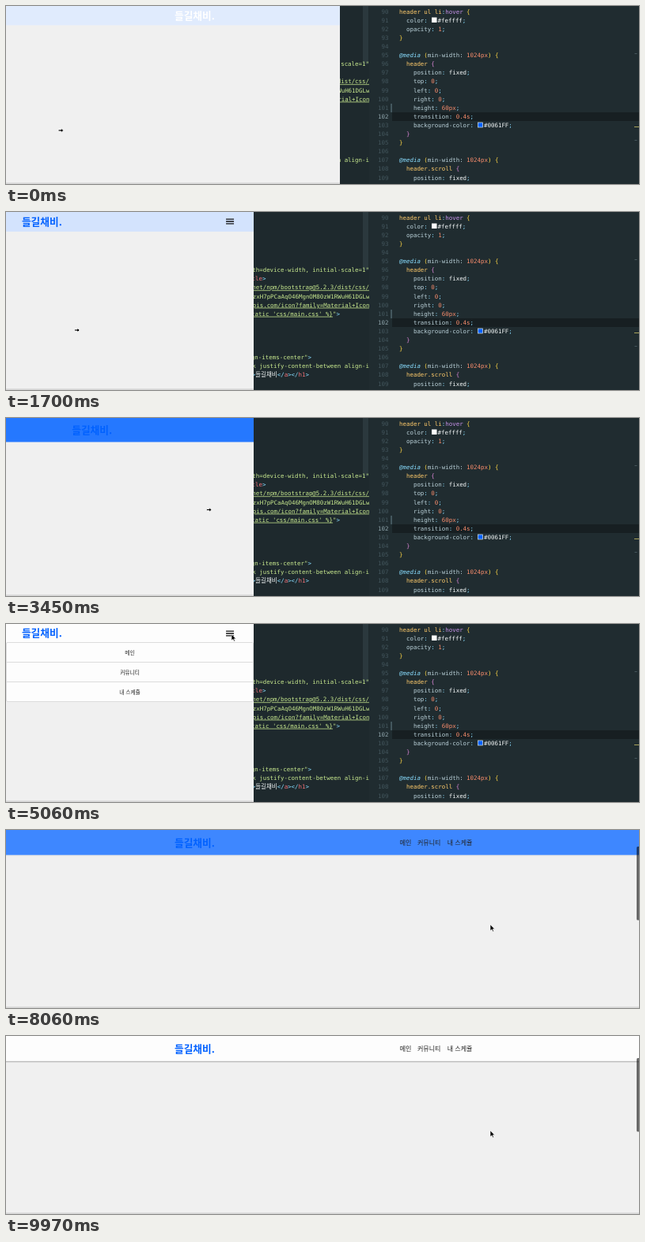
Animation, 800 px wide and 226 px high, one loop 10 s. Source, as an HTML page:

```html
<!DOCTYPE html>
<html lang="ko">
<head>
<meta charset="utf-8">
<title>Responsive header</title>
<style>
html, body { margin: 0; width: 100%; height: 100%; overflow: hidden; background: #202b2f; }
svg { display: block; width: 800px; height: 226px; }
text { white-space: pre; }
.code { font: 7.44px "DejaVu Sans Mono", "Noto Sans Mono", "Noto Sans CJK KR", monospace; fill: #c3d3d8; }
.ko { font-family: "Noto Sans CJK KR", "Noto Sans CJK", sans-serif; }
.y { fill: #ffcb6b; }
.k { fill: #89ddff; font-style: italic; }
.h { fill: #c792ea; }
.p { fill: #b9d0d8; }
.n { fill: #f78c6c; }
.w { fill: #f4f8f8; }
.g { fill: #ffd746; }
.o { fill: #d884d4; }
.s { fill: #c9ea8f; }
.u { fill: #c9ea8f; text-decoration: underline; }
.t { fill: #f07178; }
.c { fill: #89ddff; }
.num { fill: #43565d; }
.num.on { fill: #8fa4ab; }
#logo { font-size: 12.7px; font-weight: 900; }
#nav { font-size: 8px; }
#menu { font-size: 6.7px; text-anchor: middle; fill: #222; }
#badge text { font: 7.56px "Liberation Sans", Arial, sans-serif; text-anchor: end; fill: #333; }
</style>
</head>
<body>
<svg viewBox="0 0 800 226">
  <defs>
    <clipPath id="pageClip"><rect id="clipRect" height="226"/></clipPath>
    <clipPath id="leftClip"><rect width="459" height="226"/></clipPath>
    <clipPath id="menuClip"><rect id="menuRect" y="23" width="800"/></clipPath>
  </defs>

  <rect width="800" height="226" fill="#202c30"/>
  <rect width="459" height="226" fill="#1e292d"/>
  <rect x="451" width="7" height="74" fill="#2b383d"/>
  <rect x="488" y="135" width="312" height="11" fill="#171f22"/>
  <rect x="486" y="124" width="2" height="11" fill="#43575e"/>
  <path d="M794.5 60.500h3M794.5 170.500h3" stroke="#46565c"/>
  <path d="M794 153.500h6" stroke="#a9a35c"/>
  <g id="left" class="code" clip-path="url(#leftClip)"></g>
  <g id="right" class="code"></g>
  <rect x="538" y="14.500" width="6.500" height="6.500" fill="#feffff"/>
  <rect x="596.500" y="148" width="6" height="6" fill="#0061ff" stroke="#dfe8ea" stroke-width=".7"/>

  <g clip-path="url(#pageClip)">
    <rect width="800" height="226" fill="#fdfdfd"/>
    <rect id="body" height="224.500" fill="#f0f0f0"/>
    <rect y="224.500" width="800" height="1.200" fill="#c6c6c6"/>
    <rect id="shadow" width="800" height="1.600" fill="#bbb"/>
    <rect id="header" width="800"/>
    <text id="logo" class="ko">들길채비.</text>
    <g id="nav" class="ko">
      <text>메인</text><text x="22.300">커뮤니티</text><text x="60">내 스케쥴</text>
    </g>
    <path id="burger" d="M0 9.200h10M0 12h10M0 14.800h10" stroke="#111" stroke-width="1.300"/>
    <g id="menu" class="ko" clip-path="url(#menuClip)">
      <rect id="menuBox" x=".5" y="23.500" height="75" rx="1.500" fill="#fdfdfd" stroke="#dcdcdc"/>
      <path id="menuLines" stroke="#dcdcdc"/>
      <text y="38.500">메인</text><text y="63.500">커뮤니티</text><text y="88.500">내 스케쥴</text>
    </g>
    <g id="badge">
      <rect x="-59" width="59" height="13" fill="#fff" fill-opacity=".8"/>
      <text x="-1.500" y="9.700"></text>
    </g>
    <rect id="bar" x="797" width="4" height="93.500" rx="1.500" fill="#000" fill-opacity=".57"/>
  </g>

  <path id="arrow" d="M0 0V8L1.900 6.300 3.200 9 4.400 8.400 3.200 5.800H5.600Z" fill="#000" stroke="#fff" stroke-width=".6"/>
  <g id="resize" stroke-linejoin="round">
    <path id="both" d="M-4.500 0L-1.500 -2.800V-1H1.500V-2.800L4.500 0 1.500 2.800V1H-1.500V2.800Z" fill="#000" stroke="#fff" stroke-width=".8"/>
    <path id="single" d="M-3 -1H.5V-2.800L3.500 0 .5 2.800V1H-3Z" fill="#000" stroke="#fff" stroke-width=".8"/>
  </g>
</svg>
<script>
const $ = id => document.getElementById(id);
const set = (id, attrs) => { for (const k in attrs) $(id).setAttribute(k, attrs[k]); };
const show = (id, on) => { $(id).style.display = on ? '' : 'none'; };

// Code lines: chunks split by "|", the first letter of each is its colour class.
function addText(parent, x, y, chunks, anchor = 'start') {
  const el = document.createElementNS('http://www.w3.org/2000/svg', 'text');
  set.call(null, parent, {});
  el.setAttribute('x', x);
  el.setAttribute('y', y);
  el.setAttribute('text-anchor', anchor);
  for (const chunk of chunks.split('|')) {
    const span = document.createElementNS('http://www.w3.org/2000/svg', 'tspan');
    span.setAttribute('class', chunk[0]);
    span.textContent = chunk.slice(1);
    el.append(span);
  }
  $(parent).append(el);
  return el;
}

const rowY = row => 9.6 + 11.1 * row;
const media = 'k@media|w |g(|pmin-width: |n1024px|g) {';
const rule = (name, value) => `p${name}|c: |${value}|c;`;
const css = [
  [0, 'yheader ul li|c:|hhover|g {'],
  [1, 'pcolor|c:'],
  [1, rule('opacity', 'n1')],
  [0, 'g}'],
  [0, 'w'],
  [0, media],
  [1, 'yheader|o {'],
  [2, rule('position', 'wfixed')],
  [2, rule('top', 'n0')],
  [2, rule('left', 'n0')],
  [2, rule('right', 'n0')],
  [2, rule('height', 'n60px')],
  [2, rule('transition', 'n0.4s')],
  [2, 'pbackground-color|c:'],
  [1, 'o}'],
  [0, 'g}'],
  [0, 'w'],
  [0, media],
  [1, 'yheader.scroll|o {'],
  [2, rule('position', 'wfixed')]
];
css.forEach(([indent, line], i) => {
  addText('right', 497 + indent * 8.96, rowY(i), line);
  const num = addText('right', 483.5, rowY(i), 'w' + (90 + i), 'end');
  num.firstChild.setAttribute('class', i === 12 ? 'num on' : 'num');
});
addText('right', 545.5, rowY(1), 'w#feffff|c;');
addText('right', 604, rowY(13), 'w#0061FF|c;');

const html = [
  [6, 459, 's"width=device-width, initial-scale=1"'],
  [7, 328.5, 'c</|ttitle|c>'],
  [8, 463.5, 'unet/npm/bootstrap@5.2.3/dist/css/b'],
  [9, 459.5, 'szxH7pPCaAqO46MgnOM80zW1RWuH61DGLw'],
  [10, 459.5, 'uapis.com/icon?family=Material+Icon'],
  [11, 422, "ustatic 'css/main.css' %}|s\"|c>"],
  [16, 386, 'salign-items-center"|c>'],
  [17, 459, 'sk justify-content-between align-i'],
  [18, 383, 'c>|w들길채비|c</|ta|c></|th1|c>']
];
html.forEach(([row, x, line]) => addText('left', x, rowY(row), line, 'end'));

// Motion
const LOOP = 10000, SCALE = 800 / 1512, BREAK = 1024 * SCALE, LAG = 116;

const edgeKeys = [[-30, 800], [0, 423], [100, 313], [560, 313], [704, 541], [820, 800],
  [1250, 800], [1480, 313], [2280, 313], [2364, 541], [2400, 800], [3150, 800], [3400, 313],
  [6500, 313], [6640, 376], [7004, 541], [7080, 800]];
const scrollKeys = [[7800, 0], [7990, 14], [8060, 21], [8250, 35], [8650, 35], [8860, 0],
  [9300, 0], [9400, 16], [9650, 41], [9790, 41], [9970, 28]];
const cursorKeys = [[0, 69, 158], [300, 110, 152], [480, 180, 145], [700, 600, 130], [830, 840, 120],
  [1200, 840, 120], [1420, 75, 150], [1900, 100, 150], [2200, 400, 120], [2380, 840, 110],
  [3150, 840, 110], [3400, 250, 115], [3900, 313, 130], [4550, 285, 13], [5500, 285, 13],
  [6250, 313, 70], [6440, 330, 69], [6640, 590, 69], [6800, 840, 80], [7180, 840, 110], [7500, 612, 120]];
const menuSteps = [4650, 5500];
// Header colour flips, starting towards white.
const flips = [-240, 820, 1488, 2480, 3399, 7120, 7990, 8770, 9390];

function at(keys, t, col = 1) {
  const i = keys.findIndex(k => k[0] > t);
  if (i < 0) return keys[keys.length - 1][col];
  if (i === 0) return keys[0][col];
  const a = keys[i - 1], b = keys[i];
  return a[col] + (b[col] - a[col]) * (t - a[0]) / (b[0] - a[0]);
}

// CSS "ease": cubic-bezier(.25, .1, .25, 1)
function ease(x) {
  if (x <= 0) return 0;
  if (x >= 1) return 1;
  let lo = 0, hi = 1, s;
  for (let i = 0; i < 20; i++) {
    s = (lo + hi) / 2;
    if (.75 * s * (1 - s) + s ** 3 < x) lo = s; else hi = s;
  }
  return .3 * s * (1 - s) ** 2 + 3 * s * s * (1 - s) + s ** 3;
}

function blueness(t) {
  let i = 0;
  while (i + 1 < flips.length && flips[i + 1] <= t) i++;
  const e = ease((t - flips[i]) / 400);
  return i % 2 ? e : 1 - e;
}

function draw(t) {
  const edge = at(edgeKeys, t), page = at(edgeKeys, t - LAG);
  const wide = page > BREAK;
  const blue = blueness(t);
  const scrolled = (t >= 7990 && t < 8770) || t >= 9390;
  const height = 23.5 + 8.2 * (t > 7520 ? 1 : blue);
  const mid = height / 2;
  const white = wide && !scrolled;

  set('clipRect', { width: edge });
  set('body', { width: page });
  const mix = to => Math.round(253 + (to - 253) * blue);
  set('header', { height, fill: `rgb(${mix(0)},${mix(97)},${mix(255)})` });
  set('shadow', { y: height, opacity: scrolled ? 1 - blue : 0 });

  const logoX = wide ? (page - 381) / 2 + 3.5 : Math.max(6.3, (page - 285.7) / 2 + 6.3);
  set('logo', { x: logoX, y: mid + 4.7, fill: white ? '#fff' : '#0061ff' });
  show('nav', wide);
  set('nav', { transform: `translate(${page - 302.3} ${mid + 3})`, fill: white ? '#fff' : '#222' });
  show('burger', !wide);
  set('burger', { transform: `translate(${page - logoX - 15} 0)` });

  const open = ease((t - menuSteps[0]) / 350) - ease((t - menuSteps[1]) / 350);
  show('menu', open > 0 && !wide);
  set('menuRect', { height: 76 * open });
  set('menuBox', { width: page - 1 });
  set('menuLines', { d: `M0 48.500H${page}M0 73.500H${page}` });
  document.querySelectorAll('#menu text').forEach(el => el.setAttribute('x', page / 2));

  show('badge', wide && t > 200 && t < 7500);
  set('badge', { transform: `translate(${page} 0)` });
  document.querySelector('#badge text').textContent = `${Math.round(page / SCALE)}px × 425px`;

  show('bar', t > 7730);
  set('bar', { y: at(scrollKeys, t) });

  const x = at(cursorKeys, t, 1), y = at(cursorKeys, t, 2);
  const dragging = t < 3900 || (t > 6250 && t < 7180);
  show('arrow', !dragging);
  show('resize', dragging);
  show('both', x >= 300);
  show('single', x < 300);
  set(dragging ? 'resize' : 'arrow', { transform: `translate(${x} ${y})` });
}

const start = performance.now();
function tick() {
  draw((performance.now() - start) % LOOP);
  requestAnimationFrame(tick);
}
tick();
</script>
</body>
</html>
```
